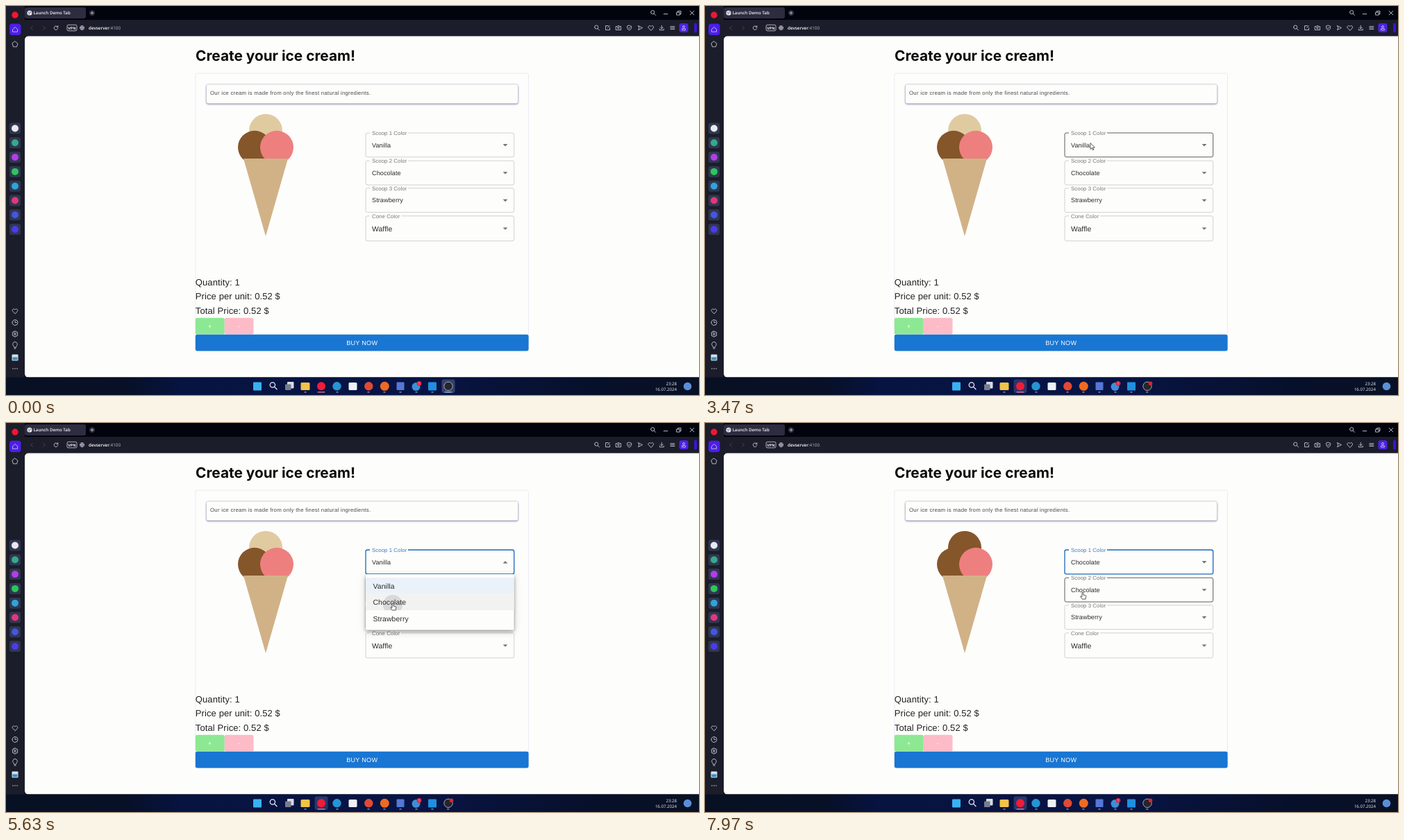
An HTML page that plays this animation: 998x561 px, repeating every 8 s.

```html
<!DOCTYPE html>
<html lang="en">
<head>
<meta charset="utf-8">
<title>Ice cream builder</title>
<style>
html, body { margin: 0; width: 100%; height: 100%; overflow: hidden; background: #000; }
svg { display: block; width: 998px; height: 561px; }
text { font-family: "Liberation Sans", Arial, sans-serif; text-rendering: geometricPrecision; white-space: pre; }
.ui { font-family: "Open Sans", sans-serif; }
.line { fill: none; stroke: #c3c6d2; stroke-width: .9; stroke-linecap: round; stroke-linejoin: round; }
#menu { filter: drop-shadow(0 2px 2px rgba(0,0,0,.28)) drop-shadow(0 2px 5px rgba(0,0,0,.2)); }
</style>
</head>
<body>
<svg id="stage" viewBox="0 0 998 561" xmlns="http://www.w3.org/2000/svg"></svg>
<script>
const LOOP = 8000;
const OPEN = 3750, PRESS = 5590, PICK = 6410, GROW = 263;
const VANILLA = '#e0cba1', CHOCOLATE = '#85562a', BERRY = '#ee7f7f', CONE = '#d1b287';
const PAGE = '#fdfdfc', BLUE = '#1976d2';

const rect = (x, y, w, h, fill, r = 0, extra = '') =>
  `<rect x="${x}" y="${y}" width="${w}" height="${h}" rx="${r}" fill="${fill}" ${extra}/>`;
const circle = (x, y, r, fill, extra = '') =>
  `<circle cx="${x}" cy="${y}" r="${r}" fill="${fill}" ${extra}/>`;
const text = (x, y, size, str, fill = '#2b2b2b', extra = '') =>
  `<text x="${x}" y="${y}" font-size="${size}" fill="${fill}" ${extra}>${str}</text>`;
const icon = (x, y, d, extra = '') =>
  `<path class="line" transform="translate(${x} ${y})" d="${d}" ${extra}/>`;
const spaced = v => `letter-spacing="${v}"`;

const ring = r => `M${-r} 0a${r} ${r} 0 1 0 ${2 * r} 0a${r} ${r} 0 1 0 ${-2 * r} 0`;
const box = r => `M${-r} ${-r}h${2 * r}v${2 * r}h${-2 * r}z`;
const HEART = 'M0 3.6L-3.4 .3C-5-1.6-2.2-4.6 0-2C2.2-4.6 5-1.6 3.4 .3Z';
const LENS = 'M-3.4-1a2.6 2.6 0 1 0 5.2 0a2.6 2.6 0 1 0-5.2 0M1.2 1L3.6 3.4';
const GLOBE = ring(3) + 'M-3 0H3M0-3Q-2.6 0 0 3Q2.6 0 0-3';

function browser() {
  let s = rect(0, 0, 998, 561, '#02040d') + rect(0, 20, 998, 24, '#1b1d2a') + rect(0, 0, 27, 536, '#1b1d2a');
  s += rect(27, 2, 88, 16, '#2d2c40', 3) + circle(34, 10, 3.6, '#e8e8ee');
  s += icon(34, 10, 'M-2-1L0 0L-1 2M1-2L2 0', 'style="stroke:#55586a"');
  s += text(39.5, 12.3, 6.2, 'Launch Demo Tab', '#f4f4f8', 'class="ui" font-weight="600"');
  s += circle(124, 10, 4, '#292b3a') + icon(124, 10, 'M-2 0H2M0-2V2');
  s += icon(932, 10, LENS) + icon(950, 11.5, 'M-2.8 0H2.8');
  s += icon(969, 10, 'M-3-1H1.4V3H-3ZM-1.4-1V-2.8H3V1.4H1.4') + icon(988, 10, 'M-2.8-2.8L2.8 2.8M2.8-2.8L-2.8 2.8');
  s += icon(37, 31.5, 'M1.5-2.5L-1.5 0L1.5 2.5', 'opacity=".25"') + icon(55, 31.5, 'M-1.5-2.5L1.5 0L-1.5 2.5', 'opacity=".25"');
  s += icon(72, 31.5, 'M2.4-1.4A2.8 2.8 0 1 0 2.8 .6M2.8-3V-1.2H1');
  s += rect(88, 27.2, 14, 8.6, 'none', 2, 'stroke="#d5d7e0" stroke-width=".8"');
  s += text(95, 33.7, 5.4, 'VPN', '#f0f0f4', 'class="ui" font-weight="700" text-anchor="middle"');
  s += icon(109.5, 31.5, GLOBE);
  s += text(119, 34, 6.3, 'devserver<tspan font-weight="400" fill="#b9bcca">:4100</tspan>', '#fff', 'class="ui" font-weight="600"');
  const tools = [LENS, 'M1-3H-3V3H3V0M0 0L3-3', 'M-3.5-2H-1.5L-1-3H1L1.5-2H3.5V3H-3.5Z' + ring(1.3),
    'M0-3.5L3-2.3V0Q2.5 2.5 0 3.5Q-2.5 2.5-3 0V-2.3ZM-1.2 0L-.2 1L1.4-1', 'M-2.6-3L3.4 0L-2.6 3L-1.5 0Z',
    HEART, 'M0-3.3V1.2M-2-.7L0 1.3L2-.7M-3 1.6V3.2H3V1.6', 'M-3-2H3M-3 0H3M-3 2H3'];
  tools.forEach((d, i) => s += icon(851 + i * 15.55, 31.5, d));
  s += rect(969.5, 25, 13, 13, '#4d20e8', 3) + icon(976, 31.5, 'M-1.5-1.6a1.5 1.5 0 1 0 3 0a1.5 1.5 0 1 0-3 0M-2.4 3V1.2H2.4V3Z');
  s += rect(991, 24.5, 4, 14, '#3d14d6', 2);
  return s + sidebar();
}

function sidebar() {
  let s = circle(13, 13, 4.7, '#ef1735') + rect(5, 25.5, 16.5, 16.5, '#4c1eea', 4);
  s += icon(13.2, 34, 'M-3.4-.5L0-3.6L3.4-.5V3.2H-3.4Z') + icon(13, 55, 'M0-4L4-.8L2.5 3.8H-2.5L-4-.8Z');
  ['#e8e9f2', '#35a98c', '#b13ee8', '#2cc65a', '#2ea3dc', '#e0387c', '#4555e0', '#4b3bea'].forEach((c, i) => {
    const y = 176.5 + i * 20.8;
    s += rect(5, y - 8, 16, 16, '#30374f', 3) + circle(13, y, 5, c);
  });
  s += icon(13, 440, HEART) + icon(13, 456.5, ring(4) + 'M0-2.4V0H2');
  s += icon(13, 473, 'M-1-4H1L1.5-2.7L3-3L4-1L3 0L4 1L3 3L1.5 2.7L1 4H-1L-1.5 2.7L-3 3L-4 1L-3 0L-4-1L-3-3L-1.5-2.7Z' + ring(1.3));
  s += icon(13, 490, 'M-1.2 2.2Q-1.2 1-2.6-.2A3.3 3.3 0 1 1 2.6-.2Q1.2 1 1.2 2.2ZM-1 4H1');
  s += rect(8.5, 502.5, 9, 9, '#cfe2ee', 1) + rect(9.5, 506.5, 7, 4, '#3f8bbf');
  [-3, 0, 3].forEach(d => s += circle(13 + d, 523, .8, '#c3c6d2'));
  return s;
}

function taskbar() {
  let s = rect(0, 535.5, 998, 25.5, 'url(#bar)');
  s += rect(444.5, 538.5, 19, 19.5, '#2b3568', 3, 'id="browserActive"') + rect(627.5, 538.5, 19, 19.5, '#333f6e', 3, 'id="recActive"');
  s += rect(356, 542.5, 12, 12, '#38b2f2', 1);
  s += `<g transform="translate(385 548) scale(1.4)">${icon(0, 0, LENS, 'style="stroke:#eef"')}</g>`;
  s += rect(405, 542, 9.5, 9.5, '#d9dbe2', 1) + rect(402, 545.5, 8.5, 8.5, '#777d8c', 1);
  s += rect(424.5, 543, 13, 11, '#f4c347', 1.5) + circle(454, 548.3, 6, '#f01c38') + circle(476.5, 548.3, 6.2, '#2695d4');
  s += rect(493.5, 543, 12, 11, '#eef1f6', 1.5) + circle(522.3, 548.3, 6.2, '#e04a35') + circle(545.3, 548.3, 6.5, '#ee6a22');
  s += rect(562.5, 542.5, 11, 11.5, '#5577d6', 1) + circle(590.5, 549, 6, '#3c8fd8');
  s += circle(595, 544.3, 3.4, '#e3263c') + text(595, 546.2, 5, '1', '#fff', 'class="ui" text-anchor="middle"');
  s += rect(608, 542.5, 12, 12, '#1f8fe0', 1) + circle(637, 548.3, 6.2, '#25262c', 'stroke="#b5b8c2" stroke-width=".9"');
  s += circle(641.5, 544.2, 2.8, '#e3222e', 'id="recDot"');
  [431, 477, 522, 545, 568, 591, 614].forEach(x => s += rect(x - 1.7, 556.3, 3.4, 1.2, '#9aa0b4', .6));
  s += rect(448.5, 556.2, 11, 1.4, '#ee7eb0', .7) + rect(631.5, 556.2, 11, 1.4, '#7ec0f0', .7, 'id="recLine"');
  s += rect(635, 556.3, 3.4, 1.2, '#9aa0b4', .6);
  const end = 'class="ui" text-anchor="end"';
  s += text(966, 547, 6.1, '23:28', '#f3f4f8', end) + text(966, 555.3, 6.1, '16.07.2024', '#f3f4f8', end);
  return s + circle(981.5, 548.5, 5.8, '#5a8fd8');
}

const fields = [
  { y: 183, h: 34.8, label: 'Scoop 1 Color', value: 'Vanilla', size: 9.1 },
  { y: 223.2, h: 34.8, label: 'Scoop 2 Color', value: 'Chocolate', size: 9.1 },
  { y: 262.8, h: 34.8, label: 'Scoop 3 Color', value: 'Strawberry', size: 9.1 },
  { y: 302.8, h: 36, label: 'Cone Color', value: 'Waffle', size: 10.4 }
];

const field = (f, i) => {
  const mid = f.y + f.h / 2, gap = i === 3 ? 45 : 55;
  return rect(518, f.y, 213.7, f.h, 'none', 2.6, `id="frame${i}"`) +
    rect(524, f.y - 1.5, gap, 3, PAGE) +
    text(527, f.y + 2.9, 7.8, f.label, '#777', `id="label${i}" ` + spaced(.07)) +
    text(527, mid + f.size * .36, f.size, f.value, '#2b2b2b', `id="value${i}" ` + spaced(.08)) +
    `<path id="arrow${i}" d="M-3.4-1.7H3.4L0 1.7Z" fill="#707070"/>`;
};

function page() {
  let s = `<path d="M27 49q0-5.5 5.5-5.5H998V535.5H32.5q-5.5 0-5.5-5.5Z" fill="${PAGE}"/>`;
  s += text(273, 78.5, 20.8, 'Create your ice cream!', '#0a0a0a', 'style="font-family:Inter,sans-serif" font-weight="700"');
  s += rect(272.8, 97, 479.7, 400, PAGE, 2.6, 'stroke="#ecebf5" stroke-width="1"');
  s += rect(288.8, 113.2, 448.4, 27.2, PAGE, 2.6, 'style="filter:drop-shadow(0 1.4px .8px rgba(70,50,130,.5)) drop-shadow(0 0 1.2px rgba(80,70,110,.4))"');
  s += text(294, 128, 7.8, 'Our ice cream is made from only the finest natural ingredients.', '#4a4a4a', spaced(.26));
  s += circle(374, 179.7, 24, VANILLA, 'id="scoop"') + circle(358, 203.8, 24, CHOCOLATE) + circle(390, 203.8, 24, BERRY);
  s += `<path d="M342 220H406L374 332Z" fill="${CONE}"/>`;
  s += fields.map(field).join('');
  ['Quantity: 1', 'Price per unit: 0.52 $', 'Total Price: 0.52 $'].forEach((str, i) =>
    s += text(272.8, 402.6 + i * 20.8, 13, str, '#222', spaced(.1)));
  s += rect(272.8, 449.7, 42, 23.8, '#8de893', 2.6) + rect(314.8, 449.7, 41.7, 23.8, '#fdbbc8', 2.6);
  const mid = 'text-anchor="middle" ';
  s += text(293.5, 464.5, 9.1, '+', '#fff', mid) + text(335, 464.5, 9.1, '-', '#fff', mid);
  s += rect(272.8, 473.8, 479.8, 23.6, BLUE, 2.6) + text(512.7, 488.8, 9.1, 'BUY NOW', '#fff', mid + spaced(.26));
  return s;
}

function menu() {
  let s = rect(518, 218, 213.7, 80.6, PAGE, 2.6);
  s += rect(518, 223.2, 213.7, 23.4, '#dfe9f4', 0, 'id="selected"') + rect(518, 246.6, 213.7, 23.4, '#f2f2f1', 0, 'id="hover"');
  s += `<g clip-path="url(#item)">${circle(557, 262, 0, '#000', 'id="ripple" opacity=".1"')}</g>`;
  ['Vanilla', 'Chocolate', 'Strawberry'].forEach((str, i) =>
    s += text(528.5, 238.8 + i * 23.4, 10.4, str, '#2b2b2b', spaced(.1)));
  return `<g id="menu">${s}</g>`;
}

document.getElementById('stage').innerHTML = `<defs>
  <linearGradient id="bar"><stop offset="0" stop-color="#081123"/><stop offset=".17" stop-color="#071026"/>
    <stop offset=".25" stop-color="#071340"/><stop offset=".6" stop-color="#081445"/><stop offset=".85" stop-color="#07102a"/><stop offset="1" stop-color="#081124"/></linearGradient>
  <clipPath id="item"><rect x="518" y="246.6" width="213.7" height="23.4"/></clipPath></defs>` +
  browser() + page() + menu() + taskbar() +
  `<g id="cursor" fill="#fff" stroke="#222" stroke-width=".75" stroke-linejoin="round">
    <path id="pointer" d="M0 0V9L2.1 7.1L3.5 10.3L4.9 9.7L3.5 6.6H6.4Z"/>
    <path id="hand" d="M-1 .8Q0-.6 1 .8V4L4.2 4.9Q5 5.1 4.8 6.3L4 10H-.8L-3.2 6.5Q-3 5.3-1.9 5.8L-1 6.5Z"/></g>`;

const $ = id => document.getElementById(id);
const set = (id, attrs) => { for (const k in attrs) $(id).setAttribute(k, attrs[k]); };
const show = (id, on) => set(id, { visibility: on ? 'visible' : 'hidden' });
const clamp = v => Math.min(1, Math.max(0, v));
const smooth = v => v * v * (3 - 2 * v);

// time, x, y of the pointer tip
const path = [[1050, -10, 330], [1750, 357, 254], [2050, 357, 254], [3000, 545, 201], [3470, 555, 197.5],
  [4150, 556, 206], [4470, 558, 251], [5000, 557, 257], [5630, 557, 260], [6400, 557, 265],
  [6750, 557, 265], [7450, 542, 250], [7970, 544, 244]];

function pointerAt(t) {
  const i = path.findIndex(p => p[0] > t);
  if (i < 1) return (i ? path[path.length - 1] : path[0]).slice(1);
  const [a, b] = [path[i - 1], path[i]], k = smooth((t - a[0]) / (b[0] - a[0]));
  return [a[1] + (b[1] - a[1]) * k, a[2] + (b[2] - a[2]) * k];
}

function draw(t) {
  const [x, y] = pointerAt(t);
  const closed = t < OPEN || t >= PICK + GROW, open = t >= OPEN && t < PICK;
  const over = closed && x > 518 && x < 732 ? fields.findIndex(f => y >= f.y && y <= f.y + f.h) : -1;
  const hand = open ? y > 223 : over >= 0 && t > 3520;

  set('cursor', { transform: `translate(${x} ${y})` });
  show('cursor', t >= 1050);
  show('hand', t >= 1050 && hand);
  show('pointer', t >= 1050 && !hand);

  fields.forEach((f, i) => {
    const focus = i === 0 && t >= OPEN;
    set('frame' + i, { stroke: focus ? '#1d69b8' : over === i ? '#333' : '#c6c6c4', 'stroke-width': focus ? 1.3 : .8 });
    set('label' + i, { fill: focus ? '#3f78c4' : '#777' });
    set('arrow' + i, { transform: `translate(719 ${f.y + f.h / 2 + .3}) scale(1 ${i === 0 && open ? -1 : 1})` });
  });
  const picked = t >= PICK;
  $('value0').textContent = picked ? 'Chocolate' : 'Vanilla';
  set('scoop', { fill: picked ? CHOCOLATE : VANILLA });

  // fade in while growing; on exit the shrink starts a third later than the fade
  const since = picked ? t - PICK : t - OPEN;
  const fade = smooth(clamp(since / GROW));
  const size = smooth(clamp((picked ? since - GROW / 3 : since) / (GROW * 2 / 3)));
  const k = picked ? 1 - size * .25 : .75 + size * .25;
  show('menu', !closed);
  set('menu', { opacity: picked ? 1 - fade : fade, transform: `translate(625 218) scale(${k} ${k * k}) translate(-625 -218)` });
  set('selected', { fill: t < PRESS - 30 ? '#dfe9f4' : '#ebf1f8' });
  set('hover', { opacity: clamp((t - 4490) / 150) });
  set('ripple', { r: 190 * clamp((t - PRESS) / 550) });

  const recording = t < 2300;
  show('recActive', recording);
  show('recLine', recording);
  show('browserActive', !recording);
  show('recDot', t >= 870);
}

function tick() {
  draw(performance.now() % LOOP);
  requestAnimationFrame(tick);
}
tick();
</script>
</body>
</html>
```
